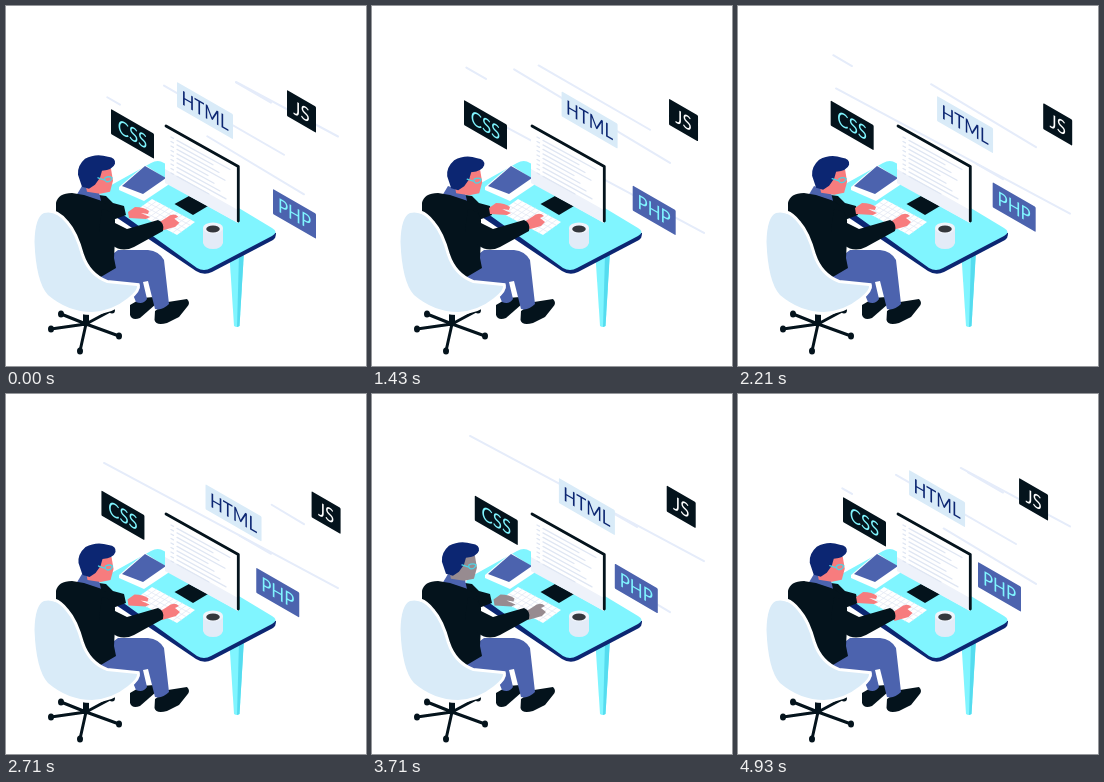
These frames come from a looping animation (360x360 px, 5 s). An HTML page:

```html
<!DOCTYPE html>
<html lang="en">
<head>
<meta charset="utf-8">
<title>Developer at a desk</title>
<style>
  html, body { margin: 0; height: 100%; overflow: hidden; background: #fff; }
  svg { display: block; width: 100%; height: 100%; --skin: #f77c7e; }
  text { font: 19.5px Lato, sans-serif; text-anchor: middle; }
  .ink { fill: #04131c; }
  .navy { fill: #0c2672; }
  .blue { fill: #4c63ae; }
  .cyan { fill: #80f5ff; }
  .pale { fill: #d9ebf8; }
  .white { fill: #fff; }
  .skin { fill: var(--skin); }
  .line { fill: none; stroke-linecap: round; stroke-linejoin: round; }
</style>
</head>
<body>
<svg viewBox="0 0 360 360">
  <g id="streaks" class="line" stroke="#e5ecfa" stroke-width="2"></g>
  <g id="cards"></g>

  <!-- desk -->
  <path class="cyan" d="M223.500 250 238 245 233.500 320Q231 322 228 320Z"/>
  <path fill="#55dcef" d="M233 248 238 245 233.500 320 231 321Z"/>
  <path class="navy" d="M95 194V201L190 265Q198 270 206 266L267 234Q270 232 270 227Z"/>
  <path class="cyan" d="M94 192Q92 187 100 182L145 157Q152 153 158 157L266 222Q273 226 266 230L205 262Q198 266 191 262Z"/>

  <!-- tablet, keyboard, stand -->
  <path class="white" d="M113 181 139 159 162 174V179L138 195 113 184Z"/>
  <path class="blue" d="M116 180 139 160 160 172 137 188Z"/>
  <path class="white" d="M128 206 146 193 189 216 171 229Z"/>
  <g id="keys" class="line" stroke="#e4e9f4" stroke-width=".8"></g>
  <path class="ink" d="M168.500 198 183 190 202 200 187 209Z"/>

  <!-- monitor -->
  <path class="white" d="M159 120 232 161V217L159 176Z"/>
  <path fill="#eef2fa" d="M159 163 232 204V217L159 177Z"/>
  <path class="line" stroke="#04131c" stroke-width="2.8" d="M160 120 232.300 160.500V215"/>
  <g id="rows" class="line" stroke="#dfe6f3" stroke-width="1.3"></g>

  <!-- mug -->
  <path fill="#e3ebf7" d="M197 222V237Q199 243 207 243T217 237V222Z"/>
  <ellipse cx="207" cy="222" rx="10" ry="5.5" fill="#f0f4fb"/>
  <ellipse cx="207" cy="223" rx="6.8" ry="3.5" fill="#34373d"/>

  <!-- chair base -->
  <path class="line" stroke="#04131c" stroke-width="3" d="M80 318 45 323M80 318 74 345M80 318 113 330M80 318 106 304M80 318 55 308"/>
  <path class="ink" d="M77 300H83V320H77Z"/>
  <g id="wheels" class="ink"></g>

  <!-- legs -->
  <path class="ink" d="M124 299 136 292 148 291 150 298 134 312Q126 315 124 309Z"/>
  <path class="ink" d="M149 305 162 296 181 293Q185 297 181 301L173 311 161 317Q150 320 148.500 314Z"/>
  <path class="blue" d="M86 270 104 250 112 244 142 244Q153 245 158 254L163 298Q156 305 149 303L142 275 137 276 141 293Q137 299 130 296L123 279 95 285Z"/>

  <!-- far arm and hand -->
  <path class="ink" d="M86 188 100 190 107 197 118 200 120 209 104 215Z"/>
  <path id="farHand" class="skin" d="M117 202 124 197Q133 197 138 201L137 204 130 203 139 207 135 209 118 208Z"/>

  <!-- torso -->
  <path class="blue" d="M70 190 76 180 93 186 95 195Z"/>
  <path class="ink" d="M50 210V197Q52 187 66 187L78 189 93 194Q105 198 107 209L109 233 108 252 110 262 88 275 60 262Z"/>
  <path id="nearHand" class="skin" d="M152 216 160 211Q167 205 172 210L168 212 173 216 169 220 155 224Z"/>
  <path class="ink" d="M96 203Q110 205 109 217L121 223 152 214Q159 217 157 225L128 241Q116 247 106 239L93 225Z"/>

  <!-- head -->
  <g id="head">
    <path class="skin" d="M79 176 94 162 105 163 107 175 104 186 94 188 81 186Z"/>
    <path class="navy" d="M72 169Q71 160 79 153 90 147 102 151 110 152 109 158 107 164 96 165L94 172 89 179 83 183 76 181Z"/>
    <path class="line" stroke="#4fd3e4" stroke-width="1.3" d="M92 172 98 174M99 172Q103 170 106 172 105 176 101 176 98 175 99 172Z"/>
  </g>

  <!-- chair seat with a white rim -->
  <path class="pale" stroke="#fff" stroke-width="6" paint-order="stroke" d="M28.500 236Q29 211 38 207 50 204 60 217 69 227 75 249 82 270 101 277L131 280Q132 284 122 292 106 305 86 306 62 306 42 289 30 276 28.500 236Z"/>
</svg>
<script>
const LOOP = 5;
const $ = id => document.getElementById(id);

function add(parent, tag, attrs, text) {
  const el = document.createElementNS('http://www.w3.org/2000/svg', tag);
  for (const key in attrs) el.setAttribute(key, attrs[key]);
  if (text) el.textContent = text;
  parent.append(el);
  return el;
}

const smooth = u => { u = Math.min(1, Math.max(0, u)); return u * u * (3 - 2 * u); };
const sway = (t, out, hold, back) => smooth(t / out) - smooth((t - hold) / (back - hold));
const slow = t => sway(t, 2.4, 2.45, 5);

// piecewise linear value through [time, value] stops
function along(stops, t) {
  for (let i = 1; i < stops.length; i++) {
    const [t0, a] = stops[i - 1], [t1, b] = stops[i];
    if (t <= t1) return a + (b - a) * Math.max(0, (t - t0) / (t1 - t0));
  }
  return stops[stops.length - 1][1];
}

const cards = [
  { text: 'CSS', x: 105, y: 103, w: 43, h: 25, fill: '#04131c', ink: '#80f5ff', dx: -13, dy: -9, ease: t => sway(t, 1.4, 1.8, 4.3) },
  { text: 'HTML', x: 171, y: 76, w: 56, h: 25, fill: '#d9ebf8', ink: '#0c2672', dx: 29, dy: 14.5, ease: slow },
  { text: 'JS', x: 281, y: 84, w: 29, h: 26, fill: '#04131c', ink: '#ffffff', dx: 25, dy: 13.5, ease: slow },
  { text: 'PHP', x: 267, y: 183, w: 43, h: 25, fill: '#4c63ae', ink: '#80f5ff', dx: -27, dy: -15, ease: t => smooth(t / 4.55) },
];
for (const c of cards) {
  c.el = add($('cards'), 'g');
  const w = c.w / 0.866;
  add(c.el, 'rect', { width: w, height: c.h, rx: 1, fill: c.fill });
  add(c.el, 'text', { x: w / 2, y: c.h / 2 + 7, fill: c.ink }, c.text);
}

// streaks rise steadily from y at their right end; the left end grows out, then retracts
const streaks = [
  { born: 0.5, slope: 0.535, right: 332, y: 252, rate: 27, left: [[0, 270], [0.3, 245], [0.95, 110], [1.3, 98], [3.2, 98], [4.5, 230], [4.95, 332]] },
  { born: 2, slope: 0.577, right: 265, y: 177, rate: 26.8, left: [[0, 240], [1, 230], [3, 230], [3.4, 265]] },
  { born: 3.15, slope: 0.6, right: 298, y: 229, rate: 22, left: [[0, 292], [0.6, 240], [1.8, 205], [2.6, 145], [3.3, 142], [4.06, 198], [4.7, 298]] },
  { born: 4.3, slope: 0.577, right: 278, y: 161, rate: 17.5, left: [[0, 278], [0.6, 158], [2.1, 158], [2.5, 278]] },
  { born: 4.7, slope: 0.577, right: 114, y: 104, rate: 18, left: [[0, 114], [0.4, 97], [2.4, 93], [2.8, 114]] },
];
for (const s of streaks) s.el = add($('streaks'), 'path');

for (let i = 0; i < 9; i++) {
  const y = 131 + i * 4.5, end = 224 - (i * 17) % 23;
  add($('rows'), 'path', { d: `M165 ${y}l2.5 1.4M171 ${y + 3.4}L${end} ${y + 3.4 + (end - 171) * 0.55}` });
}
for (let i = 1; i < 4; i++) add($('keys'), 'path', { d: `M${128 + i * 4.5} ${206 - i * 3.2}l43 23` });
for (let i = 1; i < 10; i++) add($('keys'), 'path', { d: `M${128 + i * 4.3} ${206 + i * 2.3}l18 -13` });
for (const [cx, cy] of [[45, 323], [74, 345], [113, 330], [106, 304], [55, 308]])
  add($('wheels'), 'ellipse', { cx, cy, rx: 3, ry: 3.6 });

const move = (el, x, y) => el.setAttribute('transform', `translate(${x} ${y})`);

function draw(t) {
  for (const c of cards) {
    const e = c.ease(t);
    c.el.setAttribute('transform', `matrix(.866 .5 0 1 ${c.x + c.dx * e} ${c.y + c.dy * e})`);
  }
  for (const s of streaks) {
    const age = (t - s.born + LOOP) % LOOP;
    const x = along(s.left, age), y = s.y - s.rate * age;
    s.el.setAttribute('d', x < s.right ? `M${x} ${y - s.slope * (s.right - x)}L${s.right} ${y}` : '');
  }
  const beat = t * 6 * Math.PI;
  const far = Math.max(0, Math.cos(beat)), near = Math.max(0, Math.cos(beat - 4.96));
  move($('farHand'), 5 * far, 4 * far);
  move($('nearHand'), 1.5 * near, 3 * near);
  const nod = Math.sin((t - 0.15) * 2 * Math.PI / LOOP);
  move($('head'), 0.5 + 2.7 * nod, 1.2 * nod);
  const grey = t >= 2.7 && t < 4.3;
  document.querySelector('svg').style.setProperty('--skin', grey ? '#978b90' : '#f77c7e');
}

// the picture steps 14 times a second
function tick() {
  const t = performance.now() / 1000 % LOOP;
  draw(Math.floor(t * 14) / 14);
  requestAnimationFrame(tick);
}
tick();
</script>
</body>
</html>
```
